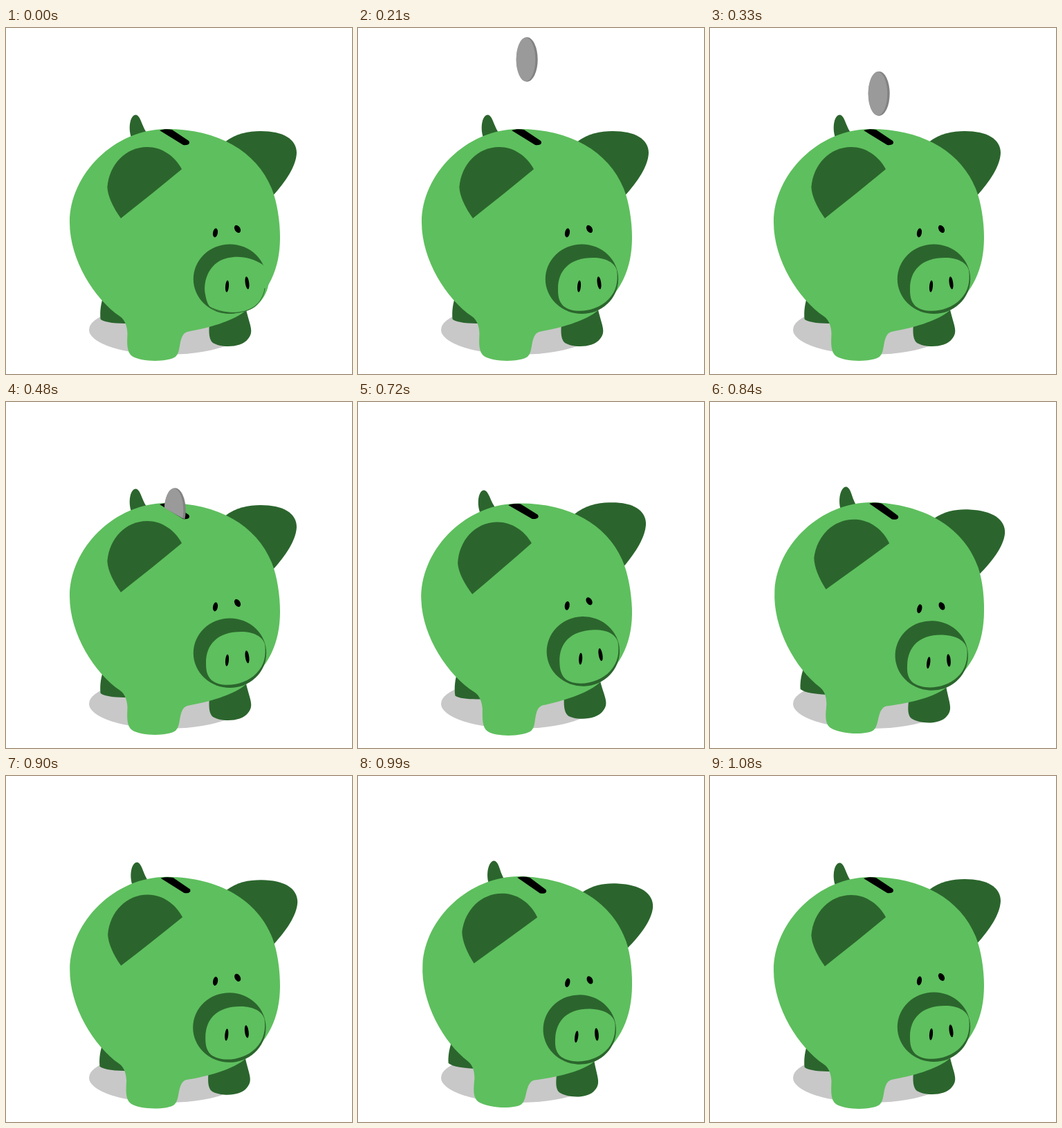
These frames come from a looping animation (500 px wide and 500 px high, 1260 ms). An HTML page:

```html
<!DOCTYPE html>
<html lang="en">
<head>
<meta charset="utf-8">
<title>Piggy bank</title>
<style>
  html, body { margin: 0; width: 100%; height: 100%; overflow: hidden; background: #fff; }
  svg { display: block; width: 100%; height: 100%; }
  .dark { fill: #2b652d; }
  .light { fill: #5ebf5e; }
</style>
</head>
<body>
<svg viewBox="0 0 500 500">
  <clipPath id="aboveSlot"><path d="M0 0H500V169H257L229 153H0Z"/></clipPath>
  <ellipse cx="232" cy="436" rx="112" ry="36" fill="#c8c8c8"/>
  <g id="pig">
    <g class="dark">
      <path d="M181 158C176 143 180 125.5 187.5 125.5C195 126.5 196 142 204 152Z"/>
      <path d="M316 165C333 152 350 149 368 149C400 149 420 160 420 181C419 200 404 222 386 242L360 220Z"/>
      <path d="M140 390C136 402 135.7 414 136.7 421C143 426 160 427 178 427V405Z"/>
      <path d="M294 425C293 440 293 450 299 455C310 462 340 463 350 449C359 438 352 430 346 403Z"/>
    </g>
    <path class="light" d="M92 281C92 211 157 146 232 146C306 146 362 178 384 232C392 252 396 280 396 303C396 348 380 383 343 411C325 424 295 433 262 439C256 441 254 446 252 454C250 464 250 470 245 475C236 482.5 196 483.5 182 474C174 468 175 455 175.5 441C175 431 172 422 165 417C128 392 92 335 92 281Z"/>
    <path class="dark" d="M166 275C155 260 147 243 146.4 230C149 197 173 172 204 172C225 172 244 185 254 204C225 228 195 252 166 275Z"/>
    <path d="M222 148C228 146 234 146 240 147L264 163C267 167 263 170 256 169Z"/>
    <ellipse rx="3.5" ry="6.5" transform="translate(302.5 296) rotate(10)"/>
    <ellipse rx="4" ry="6" transform="translate(334.5 290.5) rotate(-30)"/>
    <ellipse class="dark" cx="323.5" cy="362.7" rx="52.7" ry="50.3"/>
    <path id="snout" class="light" d="M289 377C289 350 306 332 340 332C358 332 371 339 374 350C376 365 374 380 362 392C345 410 312 414 297 402C290 395 289 387 289 377Z"/>
    <g id="wideSnout">
      <path class="light" d="M371 342C350 328 325 328 308 337C290 348 285 370 288 385C290 397 293 402 297 405C315 414 345 414 360 403C382 385 386 355 371 342Z"/>
      <path d="M294 403C320 416 348 413 362 400C369 393 373 385 374 376" fill="none" stroke="#2b652d"/>
    </g>
    <ellipse rx="2.5" ry="8.6" transform="translate(319.5 373.2) rotate(5)"/>
    <ellipse rx="2.8" ry="9.2" transform="translate(348.5 368.3) rotate(-8)"/>
  </g>
  <g clip-path="url(#aboveSlot)">
    <g id="coin">
      <ellipse cx="244.2" rx="15.5" ry="32.2" fill="#828282"/>
      <ellipse cx="242.5" rx="13.8" ry="31.6" fill="#9a9a9a"/>
    </g>
  </g>
</svg>
<script>
const LOOP = 1260, STEP = 30;
const get = id => document.getElementById(id);
const pig = get('pig'), coin = get('coin'), snout = get('snout'), wideSnout = get('wideSnout');
const show = (el, on) => el.setAttribute('visibility', on ? 'visible' : 'hidden');

// Triangle wave of 75 ms, peaking at +3 degrees
function tilt(t) {
  if (t < 570 || t >= 1080) return 0;
  const phase = (t - 540) / 75 % 1;
  return 3 * (4 * Math.abs(phase - 0.5) - 1);
}

function draw(now) {
  const t = Math.floor(now % LOOP / STEP) * STEP;
  pig.setAttribute('transform', `rotate(${tilt(t)} 250 303)`);
  coin.setAttribute('transform', `translate(0 ${45.5 + (t - 210) * 111 / 270})`);
  show(coin, t >= 30 && t < 540);
  show(wideSnout, t < 30);
  show(snout, t >= 30);
}

let start;
function tick(now) {
  start ??= now;
  draw(now - start);
  requestAnimationFrame(tick);
}
draw(0);
requestAnimationFrame(tick);
</script>
</body>
</html>
```
